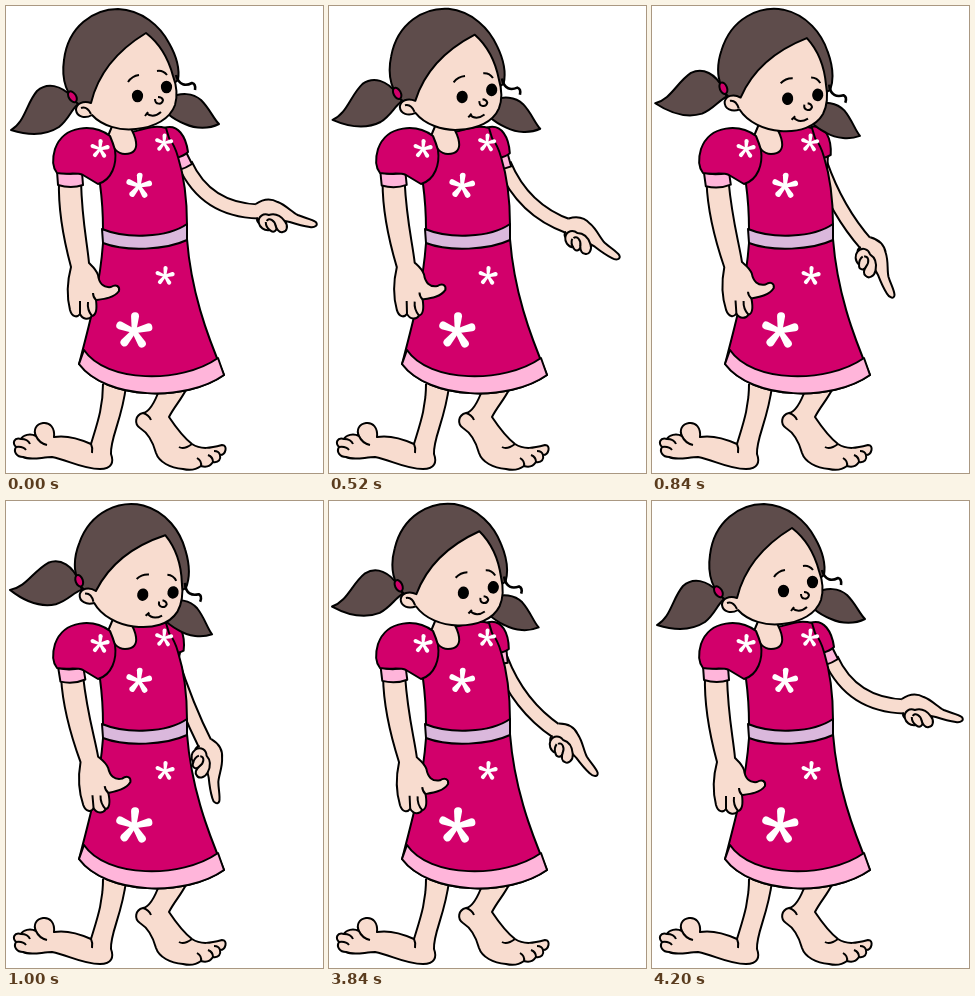
Write an HTML page that moves like this. It is 317x467 px and loops after 4960 ms.

```html
<!DOCTYPE html>
<html lang="en">
<head>
<meta charset="utf-8">
<title>Girl lowering her arm</title>
<style>
  html, body { margin: 0; width: 100%; height: 100%; overflow: hidden; background: #fff; }
  svg { display: block; width: 100%; height: 100%; }
  .line { fill: none; }
  .skin { fill: #f8dccf; }
  .hair { fill: #5e4c4b; }
  .dress { fill: #d2006b; }
  .trim { fill: #ffb5da; }
  .belt { fill: #dab8dc; }
  .ink { fill: #000; }
</style>
</head>
<body>
<svg viewBox="0 0 317 467" preserveAspectRatio="none" stroke="#000" stroke-width="2" stroke-linejoin="round">
  <defs>
    <g id="flower" fill="#fff" stroke="none"></g>
  </defs>

  <g id="legs">
    <path class="skin" d="M97 378 C97 402 91 418 85 438 C74 433 60 429 48 431 C49 422 44 416 37 417 C30 418 27 424 30 430 C24 427 17 429 15 433 C8 431 6 437 10 441 C7 446 11 451 17 451 C25 455 36 451 46 451 C62 454 76 463 94 463 C106 463 108 456 105 448 C104 432 116 414 120 380"/>
    <path class="line" d="M30 430 Q33 437 41 439 M15 433 Q22 433 24 438 M10 441 Q17 440 20 444 M85 438 Q87 442 86 447"/>
    <path class="skin" d="M154 382 C149 396 144 406 137 407 C129 409 128 418 134 422 C142 427 147 436 150 447 C153 456 164 462 177 463 C185 465 191 463 195 460 C201 462 205 459 207 456 C213 457 215 453 214 449 C220 449 222 439 216 439 C205 442 195 444 186 438 C177 431 169 420 163 411 C168 401 175 394 181 382"/>
    <path class="line" d="M137 407 Q143 409 145 414 M195 460 Q196 455 191 452 M207 456 Q207 451 202 449 M214 449 Q213 445 208 445 M173 441 Q178 444 186 438"/>
  </g>

  <g id="pointing-arm">
    <path id="arm-edge" class="line" stroke-width="16.2"/>
    <path id="arm-fill" class="line" stroke="#f8dccf" stroke-width="12.2"/>
    <g id="hand">
      <path class="skin" d="M250 198 C257 193 265 192 272 196 C280 199 286 206 292 209 C299 212 306 213 310 216 C313 219 309 222 304 221 C296 220 290 218 284 216 L279 215 C283 220 281 226 277 226 C273 227 271 223 270 220 C272 224 268 228 264 224 C258 225 254 221 253 217 C251 215 251 213 252 211.500"/>
      <path class="line" d="M253 217 C252 210 258 207 263 209 C269 207 275 210 279 215 M261 215 C263 211 269 214 270 220 M264 224 Q260 221 260 216"/>
    </g>
    <path id="right-cuff" class="trim" d="M166 152 L180 146 L186 158 Q180 162 173 164 Z"/>
    <path id="right-sleeve" class="dress" d="M158 122 C172 117 180 131 182 146 Q178 150 170 152 L160 136 Z"/>
  </g>

  <path class="dress" d="M97 237 C94 280 83 320 73 358 C100 394 180 396 218 369 C200 327 185 284 181 233 Z"/>
  <path class="trim" d="M78 344 C100 377 175 378 212 352 L218 369 C180 396 100 394 73 358 Z"/>
  <path class="dress" d="M102 130 C95 135 92 152 94 178 Q97 200 97 224 C120 235 160 232 181 219 C181 195 178 170 172 151 Q169 140 163 132 L160 122 C149 119 140 122 130 125 Z"/>
  <path class="belt" d="M96 223 C120 233 161 232 181 218 L181 234 C160 244 120 246 97 237 Z"/>
  <path class="skin" d="M107 118 L102 130 C106 142 111 148 119 148 C128 148 131 143 130 136 Q129 129 124 121"/>

  <g id="left-arm">
    <path class="skin" d="M53 175 C52 205 58 235 65 261 C61 276 61 292 64 304 C66 311 71 312 74 308 C77 314 83 314 86 310 C91 309 91 302 90 294 C98 293 108 292 113 285 C114 280 110 278 105 281 C97 282 93 277 92 269 C90 263 86 260 83 257 C81 235 76 215 75 175"/>
    <path class="line" d="M74 308 L74 295 M86 310 Q81 304 82 296 M90 294 Q87 291 87 287"/>
    <path class="trim" d="M51 165 Q63 170 76 166 L77 179 Q65 183 52 179 Z"/>
  </g>
  <path class="dress" d="M104 130 C88 118 58 118 49 143 C46 153 47 162 51 167 C61 169 70 166 77 169 L92 178 C106 174 111 158 109 144 Q107 137 104 130 Z"/>

  <g id="flowers"></g>

  <g id="head">
    <path id="right-pigtail" class="hair" d="M163 92 C175 86 187 87 195 94 C204 103 207 112 213 118 C203 123 190 123 179 118 Q169 114 162 108 Z"/>
    <path id="left-pigtail" class="hair" d="M66 91 C55 79 41 76 31 85 C20 98 19 116 5 124 C21 129 39 130 53 121 C63 113 65 104 72 98 Z"/>
    <path class="hair" d="M74 99 C61 91 55 74 58 54 C62 20 88 3 112 3 C136 4 154 20 163 37 C171 51 174 62 172 74 L140 100 Z"/>
    <path class="skin" d="M140 27 C112 44 92 68 85 97 C77 94 70 98 70 104 C71 111 79 113 86 109 C96 120 114 125 130 123 C149 121 164 113 169 99 C172 89 170 78 167 70 C162 51 153 37 140 27 Z"/>
    <path class="line" d="M75 102 Q81 100 85 108"/>
    <path class="line" stroke-width="2.6" d="M170 69 C173 80 180 80 186 77 Q190 78 189 84"/>
    <ellipse class="dress" cx="66.500" cy="91" rx="3.600" ry="6" transform="rotate(-32 66 91)"/>
    <ellipse class="ink" cx="131.500" cy="90" rx="4.600" ry="5.300"/>
    <ellipse class="ink" cx="160.500" cy="81" rx="4.600" ry="5.300"/>
    <path class="line" d="M122 76 Q126 70 133 69 M151 65 Q157 64 161 69 M149 93 C149 99 156 99 157 94 Q156 91 152 91 M140 107 Q147 113 155 106 M139 110 L142 106"/>
  </g>
</svg>
<script>
const LOOP = 4960, STEP = 40, STEPS = 17, LOWER_AT = 360, RAISE_AT = 3560;
const byId = id => document.getElementById(id);
const mix = (a, b, p) => a + (b - a) * p;
const rad = Math.PI / 180;

byId("flower").innerHTML = [0, 72, 144, 216, 288].map(a =>
  `<path transform="rotate(${a})" d="M-.12 0L-.21 -.78A.21 .21 0 0 1 .21 -.78L.12 0Z"/>`).join("");
byId("flowers").innerHTML = [[94, 143, 10], [158, 137, 9.5], [133, 180, 13.5], [159, 270, 10], [128, 325, 19]]
  .map(([x, y, r]) => `<use href="#flower" transform="translate(${x} ${y}) rotate(4) scale(${r})"/>`).join("");

function turn(id, angle, x, y, shift = "") {
  byId(id).setAttribute("transform", `${shift} rotate(${angle} ${x} ${y})`);
}

// p: 0 = arm pointing outwards, 1 = arm lowered
function pose(p) {
  turn("head", 13 * p, 118, 115);
  turn("left-pigtail", 8 * p, 66, 91);
  turn("right-pigtail", -6 * p, 166, 97, `translate(${-7 * p} 0)`);
  turn("left-arm", -5 * p, 72, 152);

  const angle = mix(34.5, 73.6, p) * rad;
  const wristX = 172 + 98 * Math.cos(angle), wristY = 150 + 98 * Math.sin(angle);
  const arm = `M${mix(179, 165, p)} 158 Q${mix(200, 180, p)} ${mix(204, 205, p)} ${wristX} ${wristY}`;
  byId("arm-edge").setAttribute("d", arm);
  byId("arm-fill").setAttribute("d", arm);
  turn("hand", 66 * p, 253, 205.5, `translate(${wristX - 253} ${wristY - 205.5})`);
  turn("right-cuff", 39 * p, 172, 140);
  turn("right-sleeve", 14 * p, 165, 130);
}

function stepsSince(t, start) {
  return Math.max(0, Math.min(STEPS, Math.floor((t - start) / STEP) + 1));
}

function draw() {
  const t = performance.now() % LOOP;
  pose((stepsSince(t, LOWER_AT) - stepsSince(t, RAISE_AT)) / STEPS);
  requestAnimationFrame(draw);
}
draw();
</script>
</body>
</html>
```
